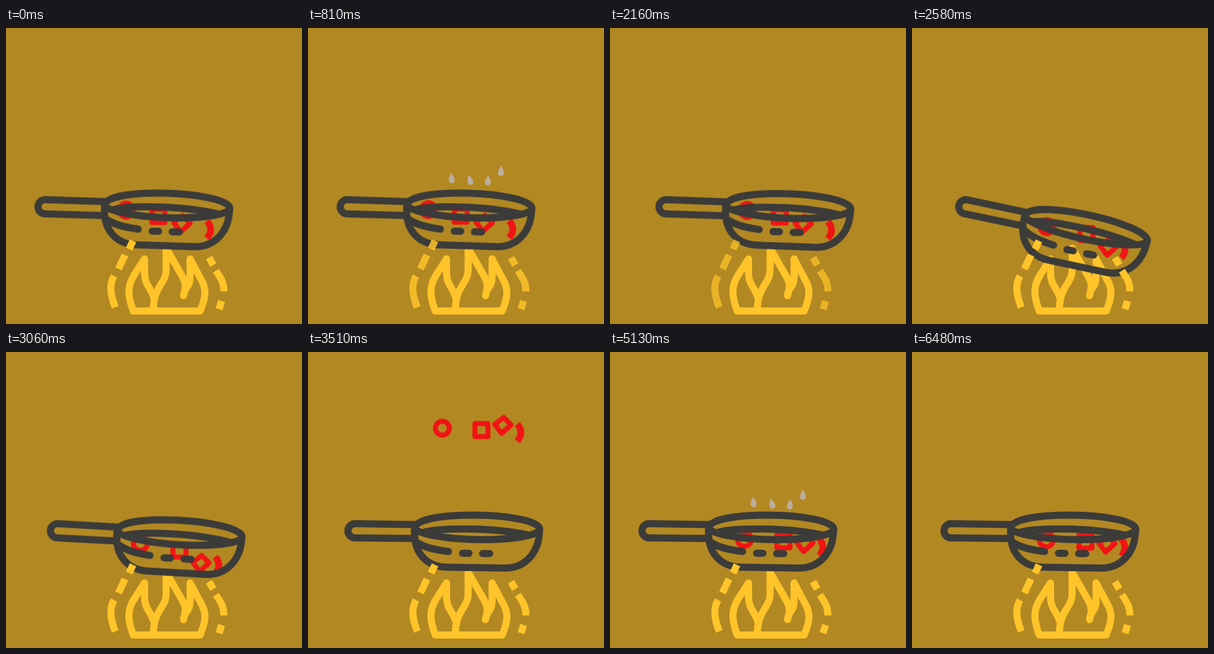
Animation of 500x500 px, one loop 6660 ms. Source, as an HTML page without scripts:

```html
<!DOCTYPE html>
<html lang="en">
<head>
<meta charset="utf-8">
<title>Frying pan</title>
<style>
  html, body { margin: 0; width: 100%; height: 100%; overflow: hidden; background: #b28822; }
  svg { display: block; width: 100%; height: 100%; }
  path, circle, rect { fill: none; stroke-linejoin: round; }

  :root { --loop: 6660ms; --sine: cubic-bezier(.37, 0, .63, 1); }

  .fire { stroke: #ffc42a; stroke-width: 12; }
  .heat { animation: heat var(--loop) linear infinite; }

  .pan {
    stroke: #3b3b39; stroke-width: 12; stroke-linecap: round;
    transform-origin: 66px 302px;
    animation: slide var(--loop) var(--sine) infinite, tilt var(--loop) var(--sine) infinite;
  }

  /* x0,y0: start; low: tilted pan; top: apex; mid: falling; x,y: rest */
  .food > * {
    stroke: #f01414; stroke-width: 8.5;
    animation: toss var(--loop) var(--sine) infinite, bob 555ms var(--sine) infinite alternate;
  }
  .ring    { --x0: 203px;   --y0: 307px; --x: 227px;   --y: 317px; --low: 344px; --top: 127px; --mid: 257px; --dx: 0px; }
  .cube    { --x0: 257.5px; --y0: 317px; --x: 293px;   --y: 320px; --low: 357px; --top: 130px; --mid: 265px; --dx: 4px; }
  .diamond { --x0: 297.5px; --y0: 330px; --x: 329.5px; --y: 324px; --low: 382px; --top: 122px; --mid: 252px; --dx: 4px; }
  .slice   { --x0: 339.5px; --y0: 340px; --x: 353.5px; --y: 330px; --low: 384px; --top: 134px; --mid: 264px; --dx: -4px; }
  .food .slice { stroke-width: 11; }

  .drops use { fill: #bbae9d; opacity: 0; animation: rise var(--loop) linear infinite; }
  .again use { animation-delay: -2343ms; }
  .d1 { --x1: 242.5px; --y1: 253px; --r1: -3deg;  --x2: 242px; --y2: 202px; --r2: 14deg; }
  .d2 { --x1: 273.5px; --y1: 256px; --r1: -14deg; --x2: 270px; --y2: 206px; --r2: 0deg; }
  .d3 { --x1: 304px;   --y1: 257px; --r1: 4deg;   --x2: 318px; --y2: 213px; --r2: 18deg; }
  .d4 { --x1: 326px;   --y1: 241px; --r1: 2deg;   --x2: 321px; --y2: 191px; --r2: -10deg; }

  @keyframes heat {
    0%, 9% { opacity: 1; }
    23.5% { opacity: .3; }
    38%, 100% { opacity: 1; }
  }
  @keyframes slide {
    0%, 12.613%, 25.225% { translate: 0; }
    6.306%, 18.919%, 31.532% { translate: 29px; }
    37.54% { translate: 25px; }
    69.4%, 100% { translate: 0; }
  }
  @keyframes tilt {
    0%, 31.532% { rotate: 1deg; }
    42.04% { rotate: 14deg; }
    47.45%, 100% { rotate: 0deg; }
  }
  @keyframes toss {
    0%, 12.613%, 25.225% { translate: var(--x0) var(--y0); }
    6.306%, 18.919%, 31.532% { translate: calc(var(--x0) + 29px) var(--y0); }
    42.04% { translate: calc(var(--x) + var(--dx)) var(--low); }
    43.84% { translate: var(--x) var(--low); animation-timing-function: cubic-bezier(.45, 0, .55, 1); }
    53.3% { translate: var(--x) var(--top); animation-timing-function: cubic-bezier(.4, 0, .7, .8); }
    60.81% { translate: var(--x) var(--mid); animation-timing-function: cubic-bezier(.33, .36, .7, 1); }
    68.47%, 100% { translate: var(--x) var(--y); }
  }
  @keyframes bob {
    from { transform: translateY(.6px); }
    to { transform: translateY(-.6px); }
  }
  @keyframes rise {
    0%, 5.256% { opacity: 0; translate: var(--x1) calc(var(--y1) + 30px); rotate: var(--r1); }
    10.51% { opacity: 1; }
    12.21% { translate: var(--x1) var(--y1); rotate: var(--r1); }
    18.77% { opacity: 1; }
    23.87% { translate: var(--x2) var(--y2); rotate: var(--r2); }
    28.53% { translate: var(--x2) calc(var(--y2) - 13px); rotate: var(--r2); }
    31.53%, 100% { opacity: 0; translate: var(--x2) calc(var(--y2) - 13px); rotate: var(--r2); }
  }
</style>
</head>
<body>
<svg viewBox="0 0 500 500">
  <defs>
    <path id="drop" style="fill: inherit" d="M0 -9C2 -4 5 -1 5 4A5 5 0 0 1 -5 4C-5 -1 -2 -4 0 -9Z"/>
  </defs>

  <g class="fire" stroke-linecap="round">
    <path d="M215 478C205 452 205 436 216 418L234 390V414C234 434 246 440 249 454"/>
    <path d="M249 476C249 436 270.5 432 270.5 409V372L298 420C306 434 302 442 300 452C300 438 311 440 311 420V390L329 424C340 442 337 456 328 478H215"/>
  </g>

  <g class="drops">
    <use class="d1" href="#drop"/><use class="d2" href="#drop"/>
    <use class="d3" href="#drop"/><use class="d4" href="#drop"/>
  </g>
  <g class="drops again">
    <use class="d1" href="#drop"/><use class="d2" href="#drop"/>
    <use class="d3" href="#drop"/><use class="d4" href="#drop"/>
  </g>

  <g class="food">
    <circle class="ring" r="11.7"/>
    <rect class="cube" x="-11" y="-11" width="22" height="22"/>
    <path class="diamond" d="M1 -13.5L13.5 -1L-2.5 13.5L-14 -2Z"/>
    <path class="slice" d="M0 -14.5Q12 0 0 14.5"/>
  </g>

  <g class="pan">
    <path d="M167 291.5L66 290A12 12 0 0 0 66 314L165 315"/>
    <path d="M167 298C167 282 215 275.5 268 275.5C325 275.5 378 286 378 299C378 311 325 317 280 317C215 317 167 305 167 298Z"/>
    <path d="M184 304C210 297 300 296 358 309"/>
    <path d="M166.5 298V308C167 340 187 363 222 363.5L320 365C352 365 378 340 377.5 299"/>
    <path d="M168 320C182 330 200 334 224 337M247.5 340h11M281.5 340.5h12"/>
  </g>

  <g class="fire heat">
    <path d="M214.5 359.5L208 373.5M201 383.5L190 407M182.5 419C175 432 175 447 184.5 472"/>
    <path d="M343 388L350 400.5M354.5 410C364 424 368 430 368 445M364 461L360 475"/>
  </g>
</svg>
</body>
</html>
```
